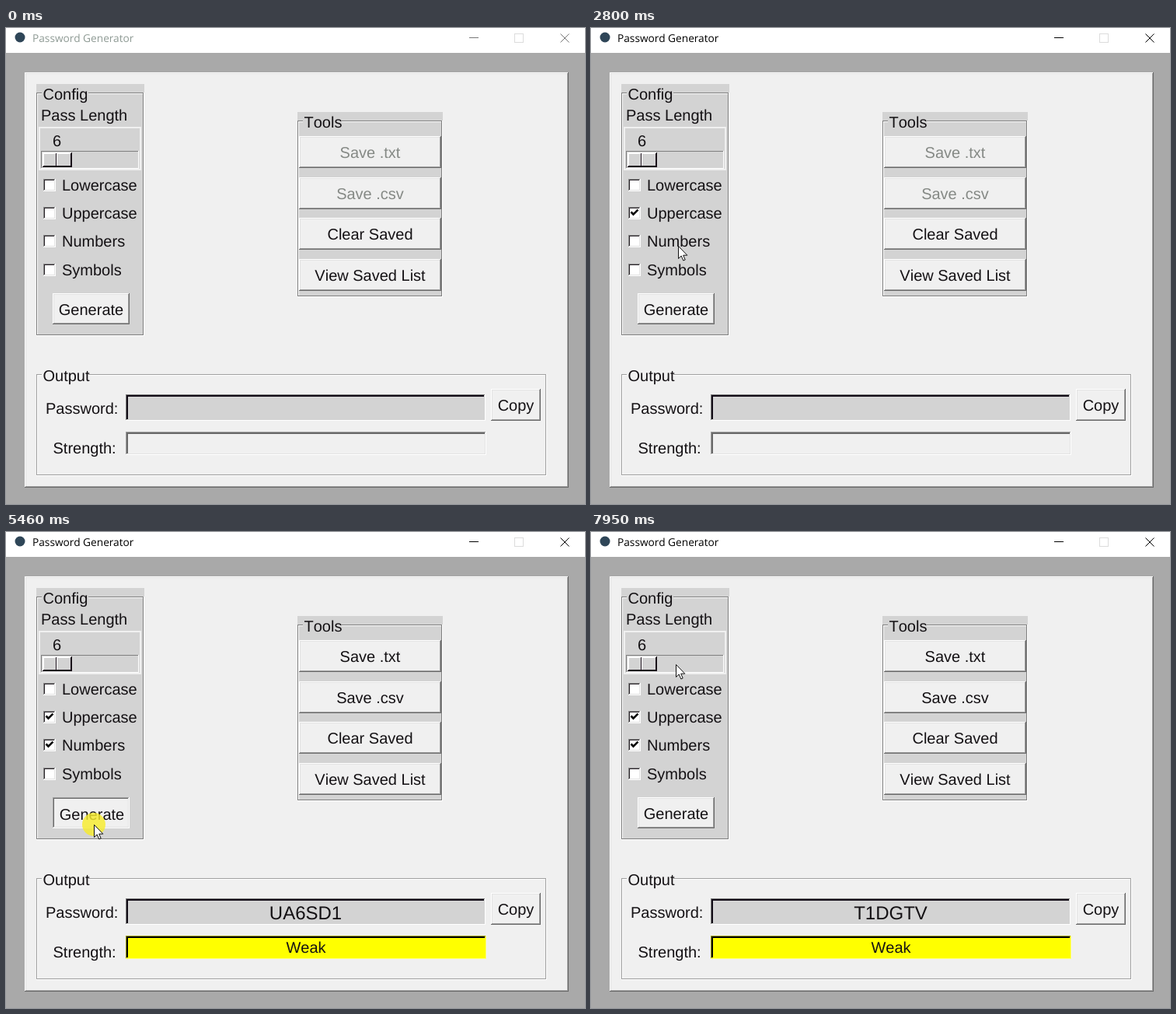
Write an HTML page that moves like this. It is 745 by 612 pixels and loops after 8000 ms.

```html
<!DOCTYPE html>
<html lang="en">
<head>
<meta charset="utf-8">
<title>Password Generator</title>
<style>
  html, body { margin: 0; width: 745px; height: 612px; overflow: hidden; background: #a9a9a9; }
  svg { display: block; }
  rect { shape-rendering: crispEdges; }
  text {
    font: 20px "Liberation Sans", Arial, sans-serif;
    font-kerning: none;
    text-rendering: geometricPrecision;
    fill: #141114;
    white-space: pre;
  }
  text.title { font: 13.7px "Open Sans", "Noto Sans", sans-serif; fill: #000; }
  text.password { font-size: 24px; }
  text.mid { text-anchor: middle; }
  .off { fill: #858985; }
  .glyph { fill: none; stroke: #000; }
  .idle text.title { fill: #8f9b95; }
  .idle .glyph { stroke: #777; }
</style>
</head>
<body>
<svg id="stage" xmlns="http://www.w3.org/2000/svg" width="745" height="612" viewBox="0 0 745 612"></svg>
<script>
const LOOP = 8000;
const FACE = '#f0f0f0', GRAY = '#d3d3d3', YELLOW = '#ff0';
// Bevel colours: outer top-left, outer bottom-right, inner top-left, inner bottom-right
const RAISED = ['#fff', '#696969', '#e3e3e3', '#a0a0a0'];
const PRESSED = ['#a0a0a0', '#fff', '#696969', '#e3e3e3'];
const GRAY_SUNKEN = ['#7f7f7f', '#fff', '#120c16', GRAY];
const YELLOW_SUNKEN = ['#999900', '#ffff7f', '#000', YELLOW];
const GRAY_GROOVE = ['#7f7f7f', '#fff', '#fff', '#7f7f7f'];
const FACE_GROOVE = ['#a0a0a0', '#fff', '#fff', '#a0a0a0'];

let parent = document.getElementById('stage');

function add(tag, attrs) {
  const el = document.createElementNS('http://www.w3.org/2000/svg', tag);
  for (const name in attrs) el.setAttribute(name, attrs[name]);
  return parent.appendChild(el);
}

function group(build) {
  const outer = parent;
  const g = parent = add('g');
  build();
  parent = outer;
  return g;
}

const box = (x, y, width, height, fill) => add('rect', { x, y, width, height, fill });

function label(x, y, content, cls = '') {
  const el = add('text', { x, y, class: cls });
  el.textContent = content;
  return el;
}

// depth is the thickness of the inner top-left edge
function bevel(x, y, w, h, colors, fill, depth = 1) {
  box(x, y, w, h, colors[1]);
  box(x, y, w - 1, h - 1, colors[0]);
  box(x + 1, y + 1, w - 2, h - 2, colors[3]);
  box(x + 1, y + 1, w - 3, h - 3, colors[2]);
  box(x + 1 + depth, y + 1 + depth, w - 3 - depth, h - 3 - depth, fill);
}

function frame(x, y, w, h, colors, fill, name, gap) {
  if (fill === GRAY) box(x, y - 11, w, h + 11, fill);
  bevel(x, y, w, h, colors, fill);
  box(x + 7, y, gap, 2, fill);
  label(x + 8.5, y + 9, name);
}

function button(x, y, w, h, name) {
  const up = group(() => bevel(x, y, w, h, RAISED, FACE));
  const down = group(() => bevel(x, y, w, h, PRESSED, FACE));
  const text = label(x + w / 2, y + h / 2 + 7.5, name, 'mid');
  return (pressed, enabled = true) => {
    show(up, !pressed);
    show(down, pressed);
    text.setAttribute('transform', pressed ? 'translate(1 1)' : '');
    text.classList.toggle('off', !enabled);
  };
}

function checkbox(y, name) {
  const glow = box(41, y - 17, 135, 36, FACE);
  bevel(48, y - 7, 16, 16, ['#8a8a8a', '#fff', '#2a242a', '#e3e3e3'], '#fff');
  const shade = group(() => bevel(48, y - 7, 16, 16, PRESSED, FACE));
  const tick = add('path', { d: `M51.5 ${y - .5}l3 3.2l6-6`, fill: 'none', stroke: '#000', 'stroke-width': 2.6 });
  label(72, y + 7.5, name);
  return (checked, active) => {
    show(tick, checked);
    show(glow, active);
    show(shade, active);
  };
}

function show(el, on) {
  el.style.display = on ? '' : 'none';
}

// Title bar
box(0, 0, 745, 32, '#fff');
const titleBar = group(() => {
  add('circle', { cx: 18, cy: 12, r: 6.5, fill: '#2f4658' });
  label(34, 18, 'Password Generator', 'title');
  add('path', { d: 'M596 12.5h12', class: 'glyph' });
  add('path', { d: 'M713.5 7.5l11 11m0-11l-11 11', class: 'glyph' });
  add('rect', { x: 654.5, y: 7.5, width: 11, height: 11, fill: 'none', stroke: '#dcdcdc' });
});

bevel(24, 57, 700, 534, RAISED, FACE);

// Config
frame(39, 83, 139, 313, GRAY_GROOVE, GRAY, 'Config', 60);
label(45, 119, 'Pass Length');
box(42, 127, 132, 56, FACE);
box(44, 129, 128, 52, GRAY);
label(60, 152, '6');
bevel(45, 158, 126, 23, ['#7f7f7f', '#fff', GRAY, GRAY], GRAY);
bevel(47, 160, 38, 19, ['#fff', '#1a101a', '#fff', '#1a101a'], GRAY);
box(64, 161, 1, 16, '#1a101a');
box(65, 161, 1, 16, '#fff');
const lowercase = checkbox(201, 'Lowercase');
const uppercase = checkbox(237, 'Uppercase');
const numbers = checkbox(273, 'Numbers');
const symbols = checkbox(310, 'Symbols');
const generate = button(60, 341, 99, 40, 'Generate');

// Tools
frame(375, 119, 187, 227, GRAY_GROOVE, GRAY, 'Tools', 50);
const saveTxt = button(377, 139, 183, 41, 'Save .txt');
const saveCsv = button(377, 192, 183, 41, 'Save .csv');
button(377, 244, 183, 41, 'Clear Saved')(false);
button(377, 297, 183, 41, 'View Saved List')(false);

// Output
frame(39, 445, 657, 131, FACE_GROOVE, FACE, 'Output', 60);
label(51, 496, 'Password:');
label(60.5, 547, 'Strength:');
bevel(154, 471, 463, 34, GRAY_SUNKEN, GRAY, 2);
const password = label(385.5, 497.5, '', 'mid password');
bevel(154, 519, 464, 30, PRESSED, FACE, 2);
const weak = group(() => {
  bevel(154, 519, 464, 30, YELLOW_SUNKEN, YELLOW, 2);
  label(386, 541, 'Weak', 'mid');
});
button(624, 464, 64, 41, 'Copy')(false);

// Pointer
const pointer = group(() => {
  add('circle', { r: 15, fill: '#f7ec2c', 'fill-opacity': .82 });
  add('path', {
    d: 'M.5.5V16.5L4.2 13L6.8 19L9.2 18L6.7 12.2H11.8Z',
    fill: '#fff', stroke: '#111', 'stroke-width': 1
  });
});
const halo = pointer.firstChild;

// Start, time per step, steps, end point, optional control point
const moves = [
  [210, 60, 1, 406, 501],
  [270, 60, 1, 62, 400],
  [600, 70, 2, 0, 202],
  [1000, 60, 1, 0, 172],
  [1080, 82, 5, 95, 231, 85, 185],
  [2210, 66, 9, 112, 280, 188, 250],
  [3390, 65, 3, 114, 352],
  [3600, 63, 4, 113, 376, 122, 372],
  [6120, 60, 1, 262, 305],
  [6180, 70, 10, 527, 161, 480, 200],
  [7410, 80, 3, 141, 154, 300, 110],
  [7810, 70, 3, 109, 170]
];

function pointerAt(t) {
  let x = 0, y = 0;
  for (const [start, gap, steps, ex, ey, cx = (x + ex) / 2, cy = (y + ey) / 2] of moves) {
    if (t < start) break;
    const u = Math.min(Math.floor((t - start) / gap) + 1, steps) / steps, v = 1 - u;
    x = v * v * x + 2 * u * v * cx + u * u * ex;
    y = v * v * y + 2 * u * v * cy + u * u * ey;
  }
  return [Math.round(x), Math.round(y)];
}

function render(t) {
  const within = (from, to) => t >= from && t < to;
  const ready = t >= 4270;
  titleBar.setAttribute('class', t < 1680 ? 'idle' : '');
  lowercase(false, false);
  uppercase(t >= 1750, within(1680, 1750));
  numbers(t >= 2870, false);
  symbols(false, false);
  generate(within(4200, 4270) || within(5460, 5590));
  saveTxt(within(6880, 7010), ready);
  saveCsv(false, ready);
  password.textContent = !ready ? '' : t < 5590 ? 'UA6SD1' : 'T1DGTV';
  show(weak, ready);
  show(pointer, within(210, 740) || t >= 1000);
  show(halo, within(1680, 1750) || within(2870, 3000) || within(4200, 4270) ||
    within(5460, 5660) || within(6880, 7010));
  pointer.setAttribute('transform', `translate(${pointerAt(t)})`);
}

const begin = performance.now();
function tick() {
  render((performance.now() - begin) % LOOP);
  requestAnimationFrame(tick);
}
tick();
</script>
</body>
</html>
```
